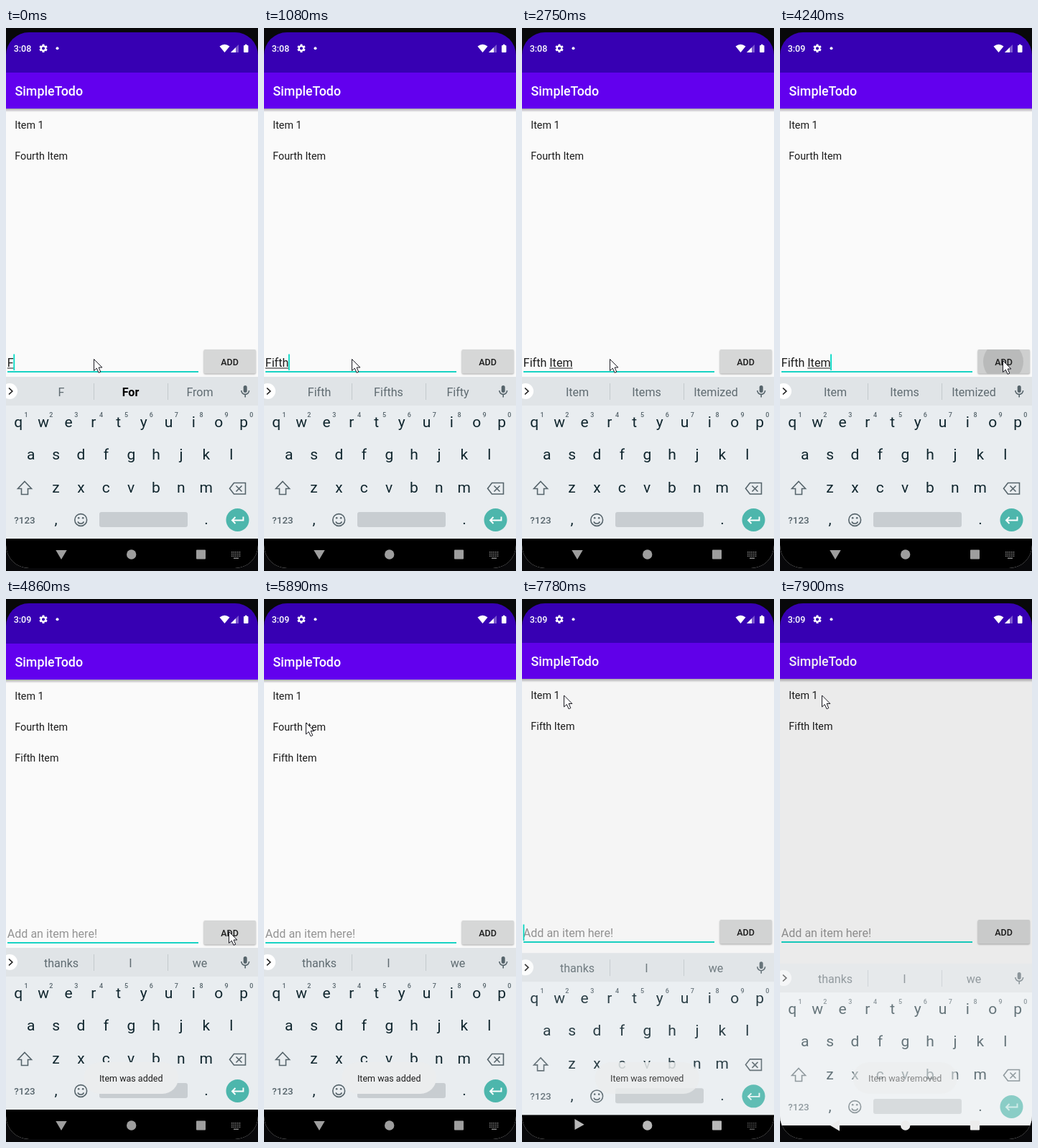
An HTML page with a canvas for the animation above (8 s loop, 351 by 755 pixels).

```html
<!DOCTYPE html>
<html lang="en">
<head>
<meta charset="utf-8">
<title>Todo list</title>
<style>
html, body { margin: 0; height: 100%; overflow: hidden; background: #08080a; }
canvas { display: block; }
</style>
</head>
<body>
<canvas id="stage" width="351" height="755"></canvas>
<script>
const c = document.getElementById('stage').getContext('2d');
const LOOP = 8000, W = 351;

// Screen refreshes: [start, count], 120 ms apart inside a run
const ticks = [
  [0, 1], [250, 1], [650, 1], [800, 1], [1080, 1], [1330, 1], [1730, 3], [2220, 1],
  [2750, 2], [3150, 6], [4120, 5], [4740, 2], [5290, 6], [6260, 2], [6530, 1],
  [6680, 7], [7520, 1], [7780, 2]
].flatMap(([start, n]) => Array.from({ length: n }, (_, i) => start + 120 * i));

// Time, input text, suggestions, whether the middle one is bold
const typing = [
  [0, 'F', 'F For From', true],
  [250, 'Fi', 'Fi First Find'],
  [650, 'Fif', 'Fif Fifth Fifteen'],
  [800, 'Fift', 'Fift Fifth Fifteen', true],
  [1080, 'Fifth', 'Fifth Fifths Fifty'],
  [1330, 'Fifth ', 'and in time'],
  [1730, 'Fifth I', 'I In It'],
  [1850, 'Fifth It', 'It Its It\'s'],
  [1970, 'Fifth Ite', 'Ite Items Item'],
  [2220, 'Fifth Item', 'Item Items Itemized'],
  [4360, '', 'thanks I we']
];

const clamp = v => Math.max(0, Math.min(1, v));
const ramp = (t, a, b) => clamp((t - a) / (b - a));
const smooth = p => p * p * (3 - 2 * p);
const mix = (a, b, p) => a + (b - a) * p;

function text(s, x, y, size, color, align = 'left', weight = 400) {
  c.font = `${weight} ${size}px Roboto, sans-serif`;
  c.textAlign = align;
  c.fillStyle = color;
  c.fillText(s, x, y);
}
function rect(x, y, w, h, color, r = 0) {
  c.fillStyle = color;
  c.beginPath();
  c.roundRect(x, y, w, h, r);
  c.fill();
}
function disc(x, y, r, color) {
  rect(x - r, y - r, 2 * r, 2 * r, color, r);
}
function fill(d, color) {
  c.fillStyle = color;
  c.fill(new Path2D(d));
}
function line(d, color, width = 1.6) {
  c.strokeStyle = color;
  c.lineWidth = width;
  c.stroke(new Path2D(d));
}
function layer(alpha, draw) {
  c.save();
  c.globalAlpha *= alpha;
  draw();
  c.restore();
}

function statusBar(t) {
  rect(0, 0, W, 62, '#3700b3');
  text(t < 2870 ? '3:08' : '3:09', 10.7, 33, 12.5, '#fff', 'left', 500);
  c.save();
  c.translate(52, 28.3);
  for (let i = 0; i < 6; i++) {
    rect(-1.5, -5.7, 3, 3, '#fff', .5);
    c.rotate(Math.PI / 3);
  }
  c.restore();
  line('M55.2 28.3a3.2 3.2 0 1 0-6.4 0a3.2 3.2 0 1 0 6.4 0', '#fff', 2.2);
  disc(71.5, 28.3, 2, '#fff');
  fill('M297.5 25.5Q304.5 20 311.5 25.5L304.5 34Z', '#fff');
  fill('M324 23V34H313Z', 'rgba(255,255,255,.35)');
  fill('M320 27V34H313Z', '#fff');
  rect(331, 24, 6.5, 10, '#fff', 1);
  rect(333, 22.7, 2.5, 2, '#fff');
}

function list(t) {
  const row = (s, y, alpha = 1) => layer(alpha, () => text(s, 12.3, y, 14.3, '#1c1c1c'));
  row('Item 1', 140);
  row('Fourth Item', 183, 1 - ramp(t, 6600, 6760));
  row('Fifth Item', mix(226, 183, smooth(ramp(t, 6700, 6900))), ramp(t, 4300, 4480));
}

function button(t) {
  layer(1, () => {
    c.shadowColor = 'rgba(0,0,0,.3)';
    c.shadowBlur = 2;
    c.shadowOffsetY = 1;
    rect(275.5, 447, 72.5, 33.5, '#d6d7d7', 2);
  });
  const fade = 1 - ramp(t, 4300, 4600);
  if (t >= 4120 && fade) layer(fade, () => {
    c.beginPath();
    c.rect(275.5, 447, 72.5, 33.5);
    c.clip();
    rect(275, 447, 74, 34, 'rgba(0,0,0,.04)');
    disc(311, 464, mix(14, 28, (t - 4120) / 120), 'rgba(0,0,0,.1)');
  });
  text('ADD', 311.6, 468.5, 12.5, '#1c1c1c', 'center', 500);
}

function input(t, [since, value]) {
  const x = 1.8, size = 16.07, y = 471;
  if (value) text(value, x, y, size, '#1c1c1c');
  else text('Add an item here!', x, y, size, '#949494');
  const end = x + c.measureText(value).width;
  const word = value.split(' ').pop();
  if (word) rect(end - c.measureText(word).width, 472.5, c.measureText(word).width, 1, '#1c1c1c');
  rect(2, 477, 266, 2, '#18d3c4');
  if ((t - since) % 1000 < 500) rect(end - .3, 453.5, 1.8, 22.5, '#03dac5');
}

function app(t, state) {
  rect(0, 62, W, 694, '#fafafa');
  const g = c.createLinearGradient(0, 112, 0, 117);
  g.addColorStop(0, 'rgba(0,0,0,.32)');
  g.addColorStop(1, 'rgba(0,0,0,0)');
  rect(0, 112, W, 5, g);
  rect(0, 62, W, 50, '#6200ee');
  text('SimpleTodo', 12.5, 94, 17.86, '#fff', 'left', 500);
  list(t);
  input(t, state);
  button(t);
}

function keyboard([, , words, bold]) {
  const ink = '#10262e', soft = '#56646b', step = 34.87;
  rect(0, 485, W, 225, '#e9edf0');
  rect(0, 485, W, 40, '#e0e4e7');
  disc(5, 505, 11, '#fff');
  line('M4 500.5L8.8 505L4 509.5', '#222', 1.7);
  words.split(' ').forEach((s, i) => {
    const strong = bold && i === 1;
    text(s, 77 + 96.5 * i, 511.5, 16.07, strong ? '#000' : '#5f6b71', 'center', strong ? 700 : 400);
  });
  rect(122, 494, 1, 23, '#c3c9cd');
  rect(225, 494, 1, 23, '#c3c9cd');
  rect(330.7, 497, 5, 10, soft, 2.5);
  line('M327.8 504a5.4 5.4 0 0 0 10.8 0M333.2 509.5V513.5', soft);

  const keys = (s, x, y) => [...s].forEach((k, i) => text(k, x + step * i, y, 21, ink, 'center'));
  keys('qwertyuiop', 17.3, 555);
  keys('asdfghjkl', 34.8, 600);
  keys('zxcvbnm', 69.5, 646);
  keys(',', 69.5, 690);
  keys('.', 279, 690);
  [...'1234567890'].forEach((k, i) => text(k, 28 + step * i, 540.5, 9, soft, 'center', 500));

  line('M26 630.5L35.5 640.5H30.5V648.5H21.5V640.5H16.5Z', soft);
  line('M317.5 632.5H333.5V648H317.5L311.5 640.2ZM320.5 636.5L328.5 644.5M328.5 636.5L320.5 644.5', soft);
  text('?123', 26, 689, 13.4, soft, 'center', 500);
  line('M112.6 684a8.4 8.4 0 1 0-16.8 0a8.4 8.4 0 1 0 16.8 0M100 686.3a4.6 4.6 0 0 0 8.4 0', soft);
  disc(101.2, 681.3, 1.3, soft);
  disc(107.2, 681.3, 1.3, soft);
  rect(130, 673, 123, 21, '#c8cdd1', 3);
  disc(322.5, 684, 16, '#4db6ac');
  line('M330.5 679.5V684.5H315.5M319.5 680L315 684.5L319.5 689', '#fff', 1.9);
}

function toast(s, alpha) {
  if (alpha <= 0) return;
  layer(alpha, () => {
    c.font = '400 12.5px Roboto, sans-serif';
    const w = c.measureText(s).width + 43;
    rect(174.2 - w / 2, 644, w, 44, '#ebedee', 22);
    text(s, 174.2, 671, 12.5, '#1e1e1e', 'center');
  });
}

function navIcons(leave) {
  const shade = Math.round(mix(158, 236, leave)), color = `rgb(${shade},${shade},${shade})`;
  c.save();
  c.translate(77, 732);
  c.rotate(leave * Math.PI / 2);
  fill('M-7.7 -6H7.7L0 7Z', color);
  c.restore();
  disc(174.7, 732, 6.7, color);
  rect(265, 725.5, 13, 13, color, 1);
  layer(1 - leave, () => {
    for (let r = 0; r < 3; r++)
      for (let i = 0; i < 5; i++) rect(314 + 2.7 * i, 728 + 2.7 * r, 1.5, 1.5, '#858585');
    rect(317, 736.5, 7, 1.5, '#858585');
  });
}

function mouse(t) {
  const go = smooth(ramp(t, 3030, 3750)), back = smooth(ramp(t, 5170, 5890));
  const up = 1 - (1 - ramp(t, 7160, 7520)) ** 3;
  c.save();
  c.translate(mix(mix(122.5, 310.5, go), 58.5, back), mix(mix(460.5, 462.5, go), 172, back) - 38 * up);
  const arrow = 'M0 0V16L3.8 12.6L6.6 18.8L9.3 17.6L6.6 11.5H11.4Z';
  fill(arrow, '#fff');
  line(arrow, '#1a1a22', 1);
  c.restore();
}

function draw(now) {
  const time = now % LOOP;
  const t = ticks.findLast(v => v <= time);
  const state = typing.findLast(k => k[0] <= t);
  const leave = ramp(t, 7720, 7900), drop = 22 * leave;

  rect(0, 0, W, 755, '#08080a');
  c.save();
  c.beginPath();
  c.roundRect(0, 6, W, 745, 32);
  c.clip();
  statusBar(t);
  c.save();
  c.translate(0, leave ? -1 : 0);
  app(t, state);
  rect(0, 62, W, 694, `rgba(0,0,0,${.06 * leave})`);
  c.restore();
  rect(0, 710, W, 45, '#000');

  c.save();
  c.translate(0, drop);
  if (leave) rect(0, 485, W, 225, '#fcfcfc');
  layer(1 - .38 * leave, () => keyboard(state));
  c.restore();
  navIcons(leave);
  toast('Item was added', ramp(t, 4300, 4740) * (1 - ramp(t, 6200, 6530)));
  toast('Item was removed', ramp(t, 6600, 6900) * (1 - .5 * leave));
  c.restore();
  mouse(t);
  requestAnimationFrame(draw);
}

const begin = performance.now();
const frame = draw;
draw = () => frame(Math.max(0, performance.now() - begin));
draw();
</script>
</body>
</html>
```
